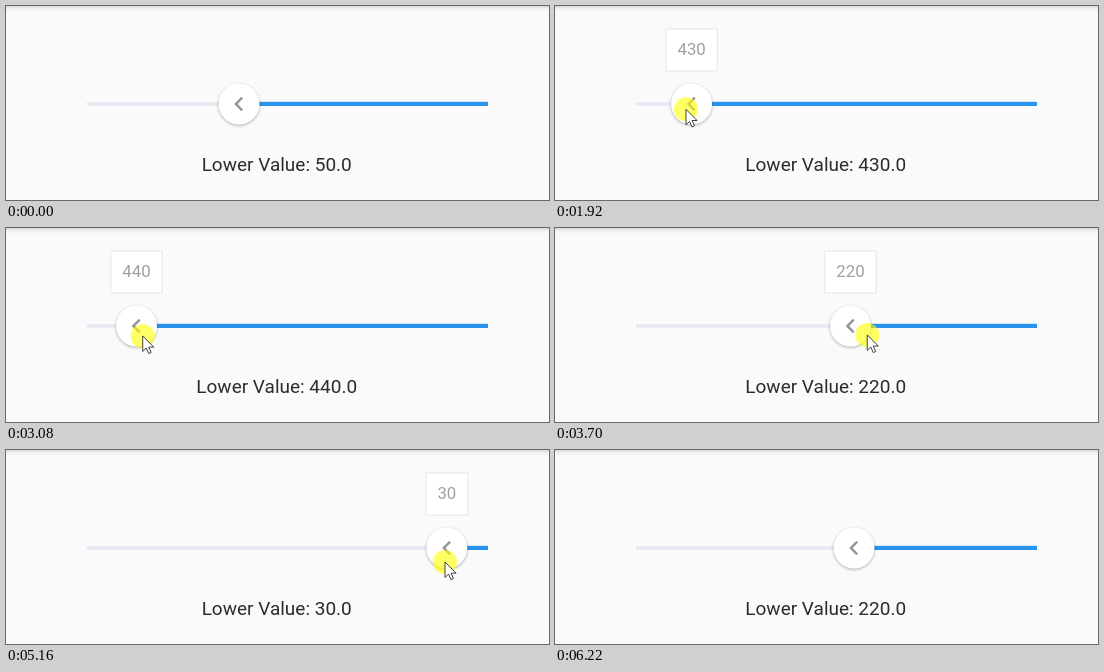
Animation of 543 by 194 pixels, one loop 6700 ms. Source, as an HTML page:

```html
<!DOCTYPE html>
<html lang="en">
<head>
<meta charset="utf-8">
<title>Slider</title>
<style>
  html, body { margin: 0; width: 100%; height: 100%; overflow: hidden; background: #fafafa; }
  svg { display: block; width: 543px; height: 194px; }
  text { font-family: Roboto, sans-serif; text-anchor: middle; }
  #handle circle { fill: #fff; filter: drop-shadow(0 1px 1.5px rgba(0, 0, 0, .3)); }
</style>
</head>
<body>
<svg viewBox="0 0 543 194">
  <defs>
    <linearGradient id="shade" x2="0" y2="1">
      <stop offset="0" stop-color="#d6d6d6"/>
      <stop offset=".4" stop-color="#eee"/>
      <stop offset="1" stop-color="#fafafa"/>
    </linearGradient>
  </defs>
  <rect width="543" height="194" fill="#fafafa"/>
  <rect width="543" height="6" fill="url(#shade)"/>
  <rect x="81" y="96.2" width="401" height="3.4" fill="#e8e7f4"/>
  <rect id="active" y="95.8" height="4.2" fill="#2a93ee"/>
  <g id="handle">
    <circle r="20.5"/>
    <path transform="scale(1.2) translate(-12 -12)" fill="#000" fill-opacity=".42"
      d="M15.41 7.41 14 6l-6 6 6 6 1.41-1.41L10.83 12z"/>
  </g>
  <g id="tooltip">
    <rect id="frame" y="23" height="42" fill="#fff" stroke="#e6e6e6"/>
    <text id="tip" y="49" font-size="16.8" fill="#a0a0a0"></text>
  </g>
  <text id="label" x="270.7" y="165.4" font-size="19" fill="#2c2c2c"></text>
  <g id="pointer">
    <circle r="12" fill="#ff0" fill-opacity=".6"/>
    <path transform="scale(.94)" fill="#fff" stroke="#222" stroke-width=".9"
      d="M0 0V16.5L3.8 12.9 6.4 18.8 9 17.6 6.4 11.9H11.8Z"/>
  </g>
</svg>
<script>
const LOOP = 6700, TICK = 1000 / 13;
const ENTER = 1, GRAB = 12, RELEASE = 75, LEAVE = 80, LAG = .5;
const MIN_X = 81, ZERO_X = 462, END_X = 482, STEP = 10, MAX = 500;

// Each stroke eases the pointer to a new place: [start tick, end tick, x, y].
const origin = [411, 195];
const strokes = [
  [ENTER, 11, 233, 101],
  [GRAB, 35.5, 57, 105],
  [35.5, 40.5, 139, 108],
  [40.5, 54.5, 452, 106],
  [54.5, 60, 505, 107],
  [62, 67, 439, 112],
  [67, RELEASE, 299, 112],
  [RELEASE, LEAVE, 450, 205]
];

const $ = id => document.getElementById(id);
const place = (id, x, y) => $(id).setAttribute("transform", `translate(${x} ${y})`);
const show = (id, on) => $(id).setAttribute("visibility", on ? "visible" : "hidden");
const clamp = (v, low, high) => Math.max(low, Math.min(high, v));
const lerp = (a, b, p) => a + (b - a) * p;
const smooth = p => p * p * (3 - 2 * p);

const pointerAt = tick => strokes.reduce(([px, py], [start, end, x, y]) => {
  const p = smooth(clamp((tick - start) / (end - start), 0, 1));
  return [lerp(px, x, p), lerp(py, y, p)];
}, origin);

// The handle trails the pointer while it is held and stays on the track.
const handleAt = tick =>
  clamp(pointerAt(clamp(tick - LAG, GRAB, RELEASE))[0], MIN_X, ZERO_X);

function draw() {
  const tick = Math.floor((performance.now() % LOOP + 12) / TICK);
  const x = handleAt(tick);
  const value = Math.ceil((ZERO_X - x) / (ZERO_X - MIN_X) * MAX / STEP) * STEP;

  $("active").setAttribute("x", x);
  $("active").setAttribute("width", END_X - x);
  place("handle", x, 98);

  const width = 23 + String(value).length * 9.45;
  show("tooltip", tick >= GRAB && tick < RELEASE);
  place("tooltip", x, 0);
  $("frame").setAttribute("x", -width / 2);
  $("frame").setAttribute("width", width);
  $("tip").textContent = value;

  // The label keeps its initial text until the first drag.
  $("label").textContent = `Lower Value: ${(tick > GRAB ? value : 50).toFixed(1)}`;

  show("pointer", tick >= ENTER && tick <= LEAVE);
  place("pointer", ...pointerAt(tick));
  requestAnimationFrame(draw);
}
draw();
</script>
</body>
</html>
```
